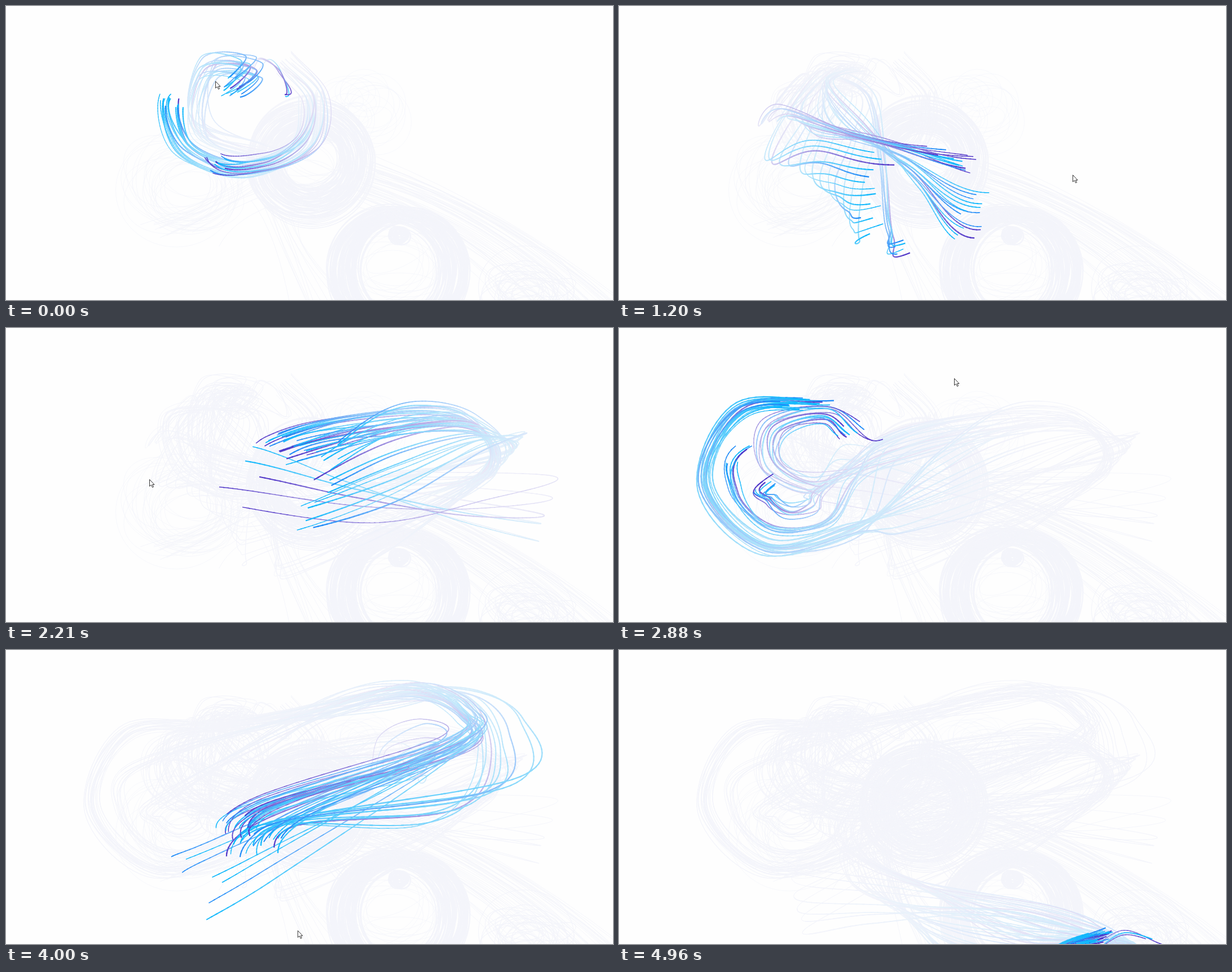
An HTML page with a canvas that plays this animation: 1076 px wide and 521 px high, repeating every 5060 ms.

```html
<!DOCTYPE html>
<html lang="en">
<head>
<meta charset="utf-8">
<title>Ribbon swarm</title>
<style>
html, body { margin: 0; width: 100%; height: 100%; overflow: hidden; background: #fefefe; }
canvas { display: block; width: 1076px; height: 521px; }
</style>
</head>
<body>
<canvas id="c" width="1076" height="521"></canvas>
<script>
const W = 1076, H = 521, LOOP = 5060, COUNT = 47;
const DT = 10, T0 = -960, FADE = 345, HOLD = 140;
const REST = [244, 245, 251], REST_CSS = 'rgb(244,245,251)';
const CYAN = [16, 184, 252], BLUE = [28, 138, 248], PURPLE = [82, 56, 200];
const ctx = document.getElementById('c').getContext('2d');

let seed = 71;
function rnd() {
  seed = (seed + 0x6D2B79F5) | 0;
  let v = Math.imul(seed ^ seed >>> 15, 1 | seed);
  v = v + Math.imul(v ^ v >>> 7, 61 | v) ^ v;
  return ((v ^ v >>> 14) >>> 0) / 4294967296;
}
const between = (a, b) => a + (b - a) * rnd();
const mix = (a, b, u) => a + (b - a) * u;
const pairs = flat => flat.flatMap((x, i) => i % 2 ? [] : [[x, flat[i + 1]]]);

// Bundle rules: each gives the way of the ribbon that lies at u (0 to 1) in the bundle.
const band = (a, b) => u => pairs(a.map((v, i) => mix(v, b[i], u)));
const flow = (spread, ...path) => () => {
  const dx = between(-spread, spread), dy = between(-spread, spread);
  return pairs(path).map(([x, y]) => [x + dx, y + dy]);
};
const arc = (cx, cy, rx, ry, from, to, tight) => u => {
  const size = mix(1, tight, u);
  return [0, 1, 2, 3, 4].map(i => {
    const a = mix(from, to, i / 4) * Math.PI / 180;
    return [cx + rx * size * Math.cos(a), cy + ry * size * Math.sin(a)];
  });
};

// Each act: the time it ends, then pairs of ribbon count and rule.
const ACTS = [
  [0, [
    [12, arc(430, 185, 145, 115, -60, 122, 0.7)],
    [3, flow(9, 420, 150, 440, 105, 462, 98, 482, 115, 490, 158)],
    [17, flow(20, 470, 262, 345, 215, 355, 108, 432, 108, 396, 143)],
    [15, arc(420, 190, 148, 115, -20, 198, 0.74)]
  ]],
  [1200, [
    [13, band([330, 120, 250, 215, 285, 173, 430, 228, 597, 250], [420, 110, 345, 160, 355, 235, 480, 245, 663, 310])],
    [14, band([400, 100, 360, 150, 375, 215, 500, 262, 650, 330], [440, 120, 375, 130, 450, 210, 530, 320, 630, 428])],
    [6, flow(10, 380, 125, 450, 160, 470, 280, 485, 400, 525, 425)],
    [14, band([350, 150, 290, 200, 257, 270, 340, 240, 512, 266], [460, 150, 455, 250, 440, 330, 428, 420, 464, 399])]
  ]],
  [2210, [
    [5, band([972, 268, 850, 312, 640, 340, 372, 305], [930, 395, 780, 345, 590, 255, 420, 196])],
    [26, band([865, 260, 800, 150, 630, 150, 455, 192], [835, 260, 850, 190, 710, 190, 500, 241])],
    [16, band([868, 250, 830, 160, 700, 140, 565, 222], [905, 190, 840, 220, 680, 320, 487, 379])]
  ]],
  [2880, [
    [12, arc(350, 215, 115, 80, 90, 345, 0.55)],
    [9, arc(310, 285, 62, 52, 0, 200, 0.5)],
    [8, arc(310, 270, 115, 97, 0, 225, 0.85)],
    [18, arc(310, 256, 172, 149, 45, 297, 0.84)]
  ]],
  [3600, [
    [8, band([620, 265, 660, 160, 740, 123, 763, 156], [700, 150, 740, 250, 750, 245, 688, 245])],
    [29, flow(14, 560, 110, 720, 72, 812, 110, 802, 170)],
    [10, band([640, 75, 820, 68, 915, 120, 905, 230], [660, 110, 810, 95, 825, 240, 721, 315])]
  ]],
  [4300, [
    [20, band([430, 270, 385, 340, 520, 410, 800, 459], [470, 290, 460, 370, 560, 430, 700, 525])],
    [7, band([380, 330, 301, 377, 520, 412, 781, 459], [480, 420, 328, 515, 440, 500, 647, 480])],
    [20, band([440, 310, 400, 400, 500, 450, 726, 470], [520, 310, 505, 400, 540, 500, 640, 580])]
  ]],
  [4960, [
    [3, flow(8, 900, 520, 930, 600, 830, 560, 890, 494, 970, 518)],
    [44, arc(845, 575, 90, 85, -40, 288, 0.75)]
  ]]
];

const POINTER = [[0, 371, 133], [400, 300, 190], [800, 360, 340], [1200, 804, 299], [1490, 930, 170], [1800, 680, 130],
  [2210, 254, 268], [2480, 180, 240], [2880, 594, 89], [3200, 855, 150], [3600, 481, 333], [4000, 560, 540], [5060, 900, 600]];

// Smooth curve through knots of [time, x, y].
function spline(knots, t) {
  const last = knots.length - 1;
  let i = 0;
  while (i < last - 1 && t > knots[i + 1][0]) i++;
  const slope = (k, d) => {
    const p = knots[Math.max(k - 1, 0)], q = knots[Math.min(k + 1, last)];
    return (q[d] - p[d]) / (q[0] - p[0]);
  };
  const a = knots[i], b = knots[i + 1], h = b[0] - a[0];
  const s = Math.max(0, Math.min(1, (t - a[0]) / h)), s2 = s * s, s3 = s2 * s;
  return [1, 2].map(d => (2 * s3 - 3 * s2 + 1) * a[d] + (s3 - 2 * s2 + s) * h * slope(i, d)
    + (3 * s2 - 2 * s3) * b[d] + (s3 - s2) * h * slope(i + 1, d));
}

function makeRibbons() {
  const list = Array.from({ length: COUNT }, (_, i) => ({
    knots: [],
    lag: between(-20, 75),
    width: between(1.2, 2.4),
    color: (i < 16 ? i % 2 === 0 : i % 11 === 5) ? PURPLE : rnd() < 0.66 ? CYAN : BLUE
  }));
  let begin = -1200;
  for (const [end, bundles] of ACTS) {
    let i = 0;
    for (const [n, rule] of bundles) {
      for (let j = 0; j < n; j++, i++) {
        rule(j * 0.618 % 1).forEach(([x, y], k, way) => list[i].knots.push(
          [mix(begin, end, (k + 1) / way.length), x + between(-6, 6), y + between(-6, 6)]));
      }
    }
    begin = end;
  }
  for (const r of list) {
    r.path = [];
    for (let t = T0; t <= LOOP; t += DT) r.path.push(spline(r.knots, t - r.lag));
  }
  return list;
}
const ribbons = makeRibbons();

// Pale strokes left behind before the loop begins.
function makeGround() {
  const cv = document.createElement('canvas');
  cv.width = W;
  cv.height = H;
  const g = cv.getContext('2d');
  g.fillStyle = '#fefefe';
  g.fillRect(0, 0, W, H);
  g.strokeStyle = REST_CSS;
  const loops = (n, cx, cy, rMin, rMax, flat, drift, width) => {
    g.lineWidth = width;
    for (let i = 0; i < n; i++) {
      const r = between(rMin, rMax);
      g.beginPath();
      g.ellipse(cx + between(-drift, drift), cy + between(-drift, drift), r, r * between(flat, 1.05),
        between(-0.6, 0.6), 0, 7);
      g.stroke();
    }
  };
  const threads = (n, a, b, c) => {
    g.lineWidth = 0.9;
    for (let i = 0; i < n; i++) {
      const u = rnd();
      const at = p => [mix(p[0], p[2], u) + between(-14, 14), mix(p[1], p[3], u) + between(-12, 12)];
      g.beginPath();
      g.moveTo(...at(a));
      g.quadraticCurveTo(...at(b), ...at(c));
      g.stroke();
    }
  };
  loops(75, 540, 274, 54, 112, 0.88, 9, 1.6);
  for (const cx of [682, 712]) loops(34, cx, 468, 84, 112, 0.95, 6, 1.8);
  loops(16, 697, 408, 2, 18, 0.7, 4, 2.5);
  loops(12, 540, 280, 40, 95, 0.3, 30, 0.7);
  loops(12, 690, 465, 50, 110, 0.3, 30, 0.7);
  loops(24, 318, 318, 50, 110, 0.55, 16, 0.7);
  loops(18, 625, 185, 20, 68, 0.6, 35, 0.6);
  loops(22, 925, 505, 25, 90, 0.2, 18, 1.1);
  threads(52, [650, 275, 620, 350], [890, 350, 800, 410], [1090, 525, 900, 540]);
  threads(12, [430, 330, 520, 380], [480, 400, 520, 440], [490, 530, 640, 540]);
  threads(12, [440, 290, 460, 360], [380, 340, 390, 380], [240, 390, 380, 420]);
  return cv;
}
const ground = makeGround();

function drawPointer(t) {
  const [x, y] = spline(POINTER, t);
  ctx.save();
  ctx.translate(x + 0.5, y + 0.5);
  ctx.beginPath();
  pairs([0, 0, 0, 12, 3, 9.5, 5, 14, 7, 13, 5, 9, 8.5, 9]).forEach(p => ctx.lineTo(...p));
  ctx.closePath();
  ctx.fillStyle = '#fff';
  ctx.strokeStyle = '#333';
  ctx.lineWidth = 1;
  ctx.fill();
  ctx.stroke();
  ctx.restore();
}

function draw(t) {
  ctx.drawImage(ground, 0, 0);
  ctx.lineCap = ctx.lineJoin = 'round';
  const end = Math.round((t - T0) / DT);
  ctx.strokeStyle = REST_CSS;
  for (const r of ribbons) {
    ctx.lineWidth = r.width * 0.65;
    ctx.beginPath();
    for (let i = 0; i <= end; i++) ctx.lineTo(...r.path[i]);
    ctx.stroke();
  }
  // Older slices first, so that fresh colour lies on top.
  ctx.lineCap = 'butt';
  for (let i = Math.max(2, end - 95); i <= end; i++) {
    const live = Math.exp((i - end) * DT / FADE);
    const fresh = Math.max(0, (live - 0.07) / 0.93);
    for (const r of ribbons) {
      const [o, p, q] = r.path.slice(i - 2, i + 1);
      ctx.strokeStyle = `rgb(${r.color.map((c, k) => Math.round(mix(REST[k], c, fresh)))})`;
      ctx.lineWidth = r.width;
      ctx.beginPath();
      ctx.moveTo(mix(p[0], o[0], 0.3), mix(p[1], o[1], 0.3));
      ctx.lineTo(...p);
      ctx.lineTo(...q);
      ctx.stroke();
    }
  }
  drawPointer(t);
}

// Every act is held in equal steps of about HOLD ms.
function snap(t) {
  const k = ACTS.findLastIndex(act => act[0] <= t);
  if (k === ACTS.length - 1) return ACTS[k][0];
  const from = ACTS[k][0], span = ACTS[k + 1][0] - from, n = Math.round(span / HOLD);
  return from + Math.floor((t - from) / span * n) * span / n;
}

const start = performance.now();
let shown = -1;
function tick() {
  const t = snap((performance.now() - start) % LOOP);
  if (t !== shown) {
    shown = t;
    draw(t);
  }
  requestAnimationFrame(tick);
}
tick();
</script>
</body>
</html>
```
